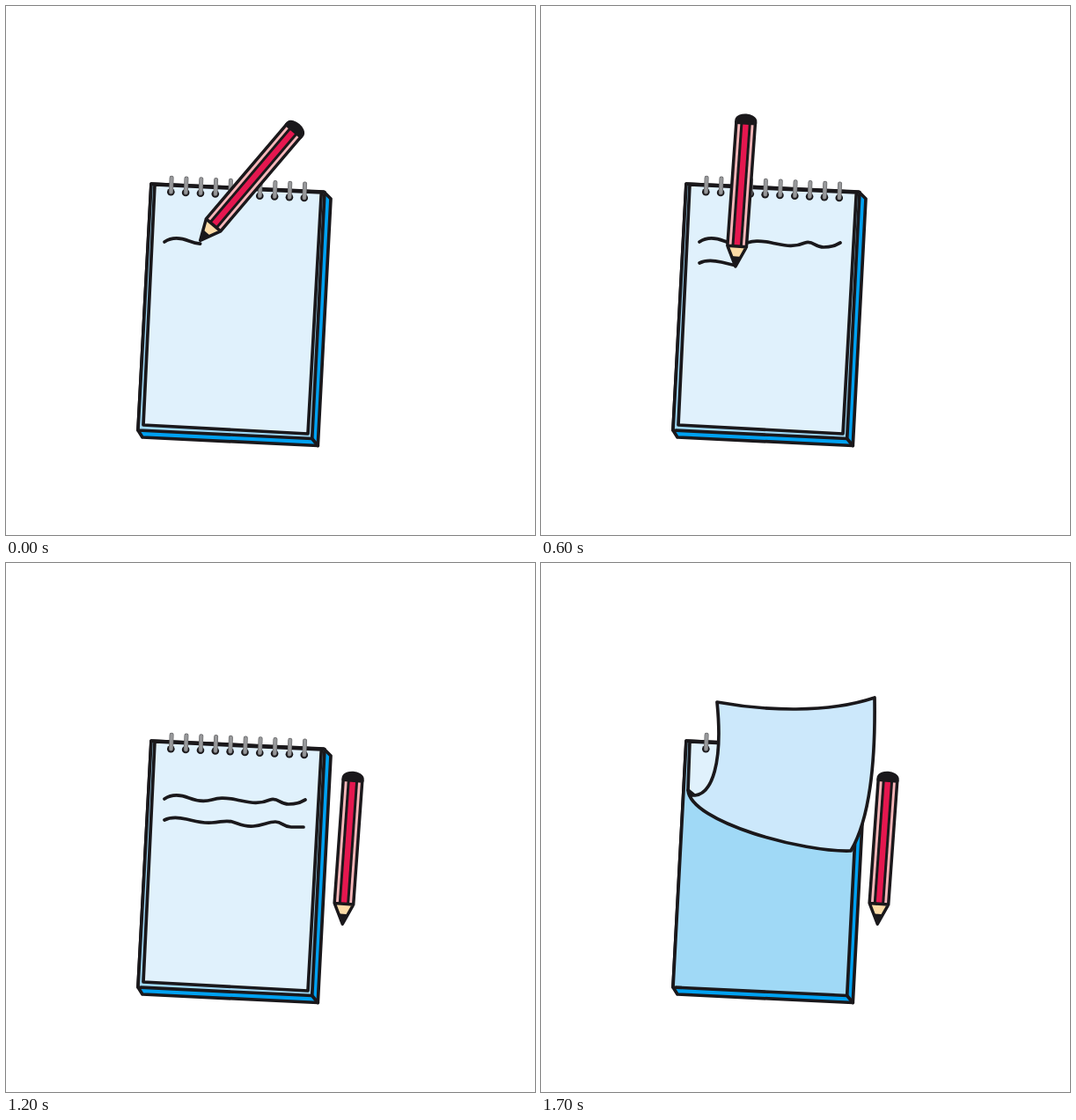
An HTML page that plays this animation: 601 px wide and 601 px high, repeating every 1800 ms.

```html
<!DOCTYPE html>
<html lang="en">
<head>
<meta charset="utf-8">
<title>Notepad</title>
<style>
  html, body { margin: 0; width: 100%; height: 100%; overflow: hidden; background: #fff; }
  svg { display: block; width: 100vw; height: 100vh; }
  .ink { stroke: #1a181b; stroke-width: 3.7; stroke-linejoin: round; stroke-linecap: round; }
</style>
</head>
<body>
<svg viewBox="0 0 601 601">
  <clipPath id="paper"><path id="paperShape"/></clipPath>
  <g class="ink">
    <path fill="#00a1f1" d="M165 202L361 211L369 219L354.3 499.5L155 490L150 482Z"/>
    <path fill="#a0d9f6" d="M165 202L362 211.5L347.7 491.5L150 482Z"/>
    <path d="M347.7 491.5L354.3 499.5"/>
    <path id="page" fill="#e0f1fc"/>
    <g clip-path="url(#paper)" fill="none">
      <path id="line1" pathLength="160" d="M180 268C189 262 198 263 208 267S227 271 234 269S247 266 262 269S286 275 300 269C309 266 311 274 321 274S334 272 340 269"/>
      <path id="line2" pathLength="158" d="M180 292C188 288 196 289 205 291S222 296 234 295S250 292 257 294S270 300 281 299S298 294 306 294S315 300 324 300L338 300"/>
    </g>
  </g>
  <g id="rings"></g>
  <path id="flap" class="ink"/>
  <!-- pencil drawn upright with its point near the origin -->
  <g id="pencil">
    <path fill="#f7b6b9" d="M-11-22.5H11V-164H-11Z"/>
    <path fill="#1a181b" d="M-6.2-22.5H6.2V-164H-6.2Z"/>
    <path fill="#e5174f" d="M-3.2-22.5H3.2V-164H-3.2Z"/>
    <path fill="#fcdba6" d="M-11-22.5H11L0 1Z"/>
    <path fill="#1a181b" d="M-6-11H6L0 1Z"/>
    <path class="ink" style="stroke-width:3.5" fill="none" d="M0 .5L-10.8-22.5V-164H10.8V-22.5ZM-10.8-22.5H10.8"/>
    <path class="ink" style="stroke-width:3.5" fill="#1a181b" d="M-10.8-163V-166C-9-173.5 9-173.5 10.8-166V-163Z"/>
  </g>
</svg>
<script>
const LOOP = 1800;
const SLANT = 40.4, UPRIGHT = 4.1;
const $ = id => document.getElementById(id);

// page: outline after the top edge; flap: the turned-over paper
const folds = [
  { page: "L343 486L156 476Z", flap: "" },
  {
    page: "L343 486L212 479C182 462 166 440 159 415Z",
    flap: "M159 415C170 422 184 427 197 427C197 448 202 465 212 479C182 462 166 440 159 415Z",
    color: "#bfe5fb"
  },
  {
    page: "L343 486L290 484C208 440 178 385 163 335Z",
    flap: "M163 335C185 350 215 362 243 363C246 405 262 455 290 484C208 440 178 385 163 335Z",
    color: "#bfe5fb"
  },
  {
    page: "L350 385L165 303Z",
    flap: "M165 303C188 310 212 303 228 291C262 330 320 365 368 378C366 402 360 425 351 440C290 440 205 400 165 303Z",
    color: "#cce8fb"
  },
  {
    page: "L354 300L166 278Z",
    flap: "M166 278C185 281 200 265 209 233C255 260 315 284 373 294C371 325 366 345 355 368C300 392 215 371 166 278Z",
    color: "#cce8fb"
  },
  {
    page: "L352 320L200 285L167 258Z",
    flap: "M167 258C168 264 171 264 175 264C194 262 207 228 200 158C255 168 325 171 379 153C380 220 374 290 352 327C300 329 170 295 167 258Z",
    color: "#cce8fb"
  }
];

// pencil point, pencil angle, written length of both lines
const strokes = [
  { x: 221, y: 266, angle: SLANT, written: [41, 0] },
  { x: 278, y: 270.5, angle: UPRIGHT, written: [99, 0] },
  { x: 336, y: 266, angle: SLANT, written: [160, 0] },
  { x: 221, y: 295.5, angle: UPRIGHT, written: [160, 41] },
  { x: 278, y: 294, angle: SLANT, written: [160, 98] },
  { x: 336, y: 297.5, angle: UPRIGHT, written: [160, 158] }
];
const resting = { x: 382.3, y: 409.7, angle: UPRIGHT, written: [160, 158] };

for (let i = 0; i < 10; i++) {
  const x = 187.3 + i * 16.83, y = 211.3 + i * 0.74;
  const wire = `M${x + 0.8} ${y - 16}L${x + 0.2} ${y}`;
  $("rings").innerHTML +=
    `<circle cx="${x}" cy="${y}" r="4.3" fill="#1a181b"/>` +
    `<path d="${wire}" stroke="#69696b" stroke-width="5" stroke-linecap="round"/>` +
    `<path d="${wire}" stroke="#97989a" stroke-width="3.6" stroke-linecap="round"/>`;
}

function write(line, length) {
  line.style.display = length ? "" : "none";
  line.setAttribute("stroke-dasharray", `${length} 400`);
}

function draw(time) {
  const writing = time < 1200;
  const pose = writing ? strokes[Math.floor(time / 200)] : resting;
  const fold = folds[writing ? 0 : Math.floor((time - 1200) / 100)];
  const outline = "M169 203L358.3 212" + fold.page;
  $("pencil").setAttribute("transform", `translate(${pose.x} ${pose.y}) rotate(${pose.angle})`);
  write($("line1"), pose.written[0]);
  write($("line2"), pose.written[1]);
  $("page").setAttribute("d", outline);
  $("paperShape").setAttribute("d", outline);
  $("flap").setAttribute("d", fold.flap);
  $("flap").setAttribute("fill", fold.color || "none");
}

const start = performance.now();
function tick() {
  draw((performance.now() - start) % LOOP);
  requestAnimationFrame(tick);
}
tick();
</script>
</body>
</html>
```
